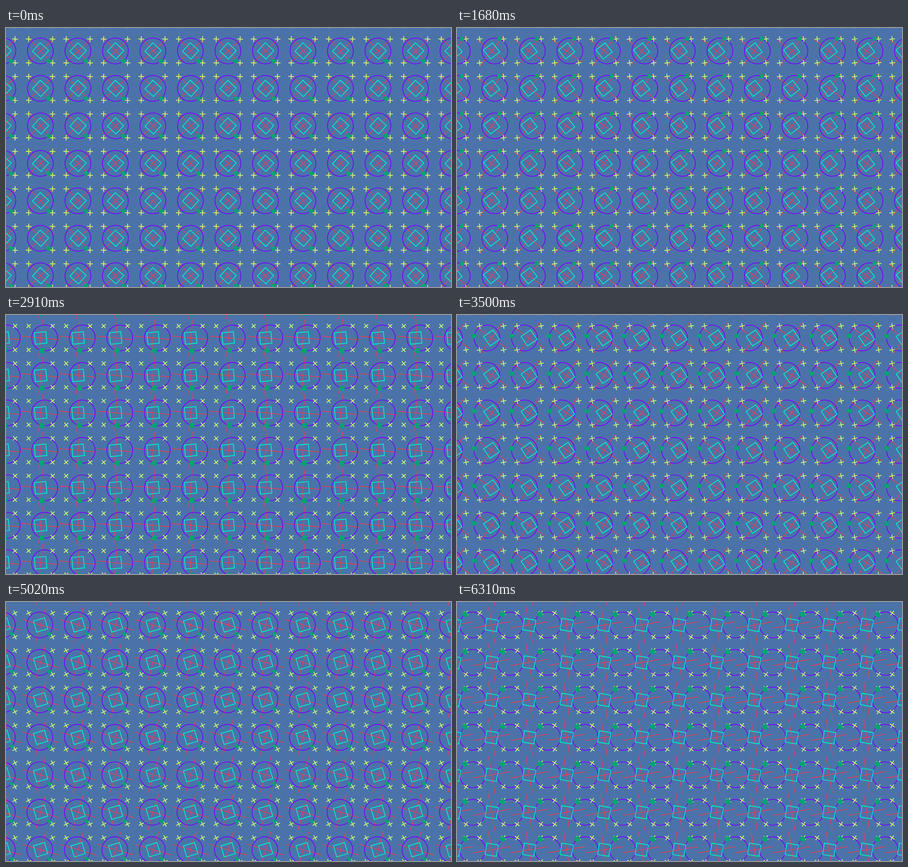
An HTML page that plays this animation: 980 px wide and 571 px high, repeating every 6.41 s.

```html
<!DOCTYPE html>
<html lang="en">
<head>
<meta charset="utf-8">
<title>Turning tiles</title>
<style>
  html, body { margin: 0; width: 100%; height: 100%; overflow: hidden; background: #4b73a9; }
  svg { display: block; width: 980px; height: 571px; }
</style>
</head>
<body>
<svg id="stage" viewBox="0 0 980 571" fill="none" stroke-width="1.7">
  <defs>
    <g id="cross" stroke="#d8435c"><path d="M-41.3 0H41.3M0 -41.3V41.3"/></g>
    <g id="ring" stroke="#7a00ff"><circle r="28.5"/></g>
    <g id="square" stroke="#00f2c8"><rect x="-12.7" y="-12.7" width="25.4" height="25.4"/></g>
    <g id="plus" stroke="#d3ff72"></g>
    <g id="dot" fill="#00a572"><circle/></g>
  </defs>
</svg>
<script>
const NS = 'http://www.w3.org/2000/svg';
const TILE = 82.6, CENTER_X = 76.2, CENTER_Y = 50.6, ORBIT = 28.7, CORNER = 26.3;
const LOOP = 6410, LAST = 6310, FIRST_HOLD = 170, HOLD = 300.5, HOLDS = 20;

const $ = id => document.getElementById(id);

function add(parent, tag, attrs) {
  const el = parent.appendChild(document.createElementNS(NS, tag));
  for (const key in attrs) el.setAttribute(key, attrs[key]);
  return el;
}

const arms = [];
for (const x of [-CORNER, CORNER])
  for (const y of [-CORNER, CORNER]) {
    const corner = add($('plus'), 'g', { transform: `translate(${x} ${y})` });
    arms.push(add(corner, 'path', { d: 'M-6.2 0H6.2M0 -6.2V6.2' }));
  }

const parts = ['cross', 'ring', 'square', 'plus', 'dot'];
for (const part of parts) {
  const layer = add($('stage'), 'g', {});
  for (let row = -1; row < 8; row++)
    for (let col = -2; col < 13; col++)
      add(layer, 'use', {
        href: '#' + part,
        x: (CENTER_X + col * TILE).toFixed(1),
        y: (CENTER_Y + row * TILE).toFixed(1)
      });
}

// cubic-bezier(.42, 0, .58, 1), solved by bisection
function easeInOut(p) {
  let lo = 0, hi = 1, u = 0.5;
  for (let i = 0; i < 20; i++) {
    const v = 1 - u;
    const x = 1.26 * u * v * v + 1.74 * u * u * v + u ** 3;
    if (x < p) lo = u; else hi = u;
    u = (lo + hi) / 2;
  }
  return u * u * (3 - 2 * u);
}

// The rings slide three tiles to the right in 4 s, then back.
function ringShift(sec) {
  const p = Math.max(0, (sec - 1.176) / 4);
  return (3 * TILE * easeInOut(p > 1 ? 2 - p : p)) % TILE - 0.5;
}

const turn = (el, deg) => el.setAttribute('transform', `rotate(${deg})`);
const [cross, ring, square, , dot] = parts.map(id => $(id).firstElementChild);

function draw(ms) {
  const sec = ms / 1000;
  const spin = -42.5 + 48 * sec;
  const orbit = (51 + 143.2 * sec) * Math.PI / 180;
  const shift = ringShift(sec);
  turn(cross, spin);
  turn(square, -spin);
  for (const arm of arms) turn(arm, spin + 45);
  ring.setAttribute('cx', shift);
  dot.setAttribute('cx', shift + ORBIT * Math.cos(orbit));
  dot.setAttribute('cy', ORBIT * Math.sin(orbit));
  dot.setAttribute('r', 5 - Math.cos((sec - 0.95) / 3.57 * 2 * Math.PI));
}

// The picture advances in holds of about 0.3 s.
function heldTime(t) {
  if (t >= LAST) return LAST;
  if (t < FIRST_HOLD) return 0;
  const n = Math.min(HOLDS - 1, Math.floor((t - FIRST_HOLD) / HOLD));
  return FIRST_HOLD + n * HOLD;
}

const start = performance.now();
let shown = -1;

function tick() {
  const held = heldTime((performance.now() - start) % LOOP);
  if (held !== shown) draw(shown = held);
  requestAnimationFrame(tick);
}
tick();
</script>
</body>
</html>
```
